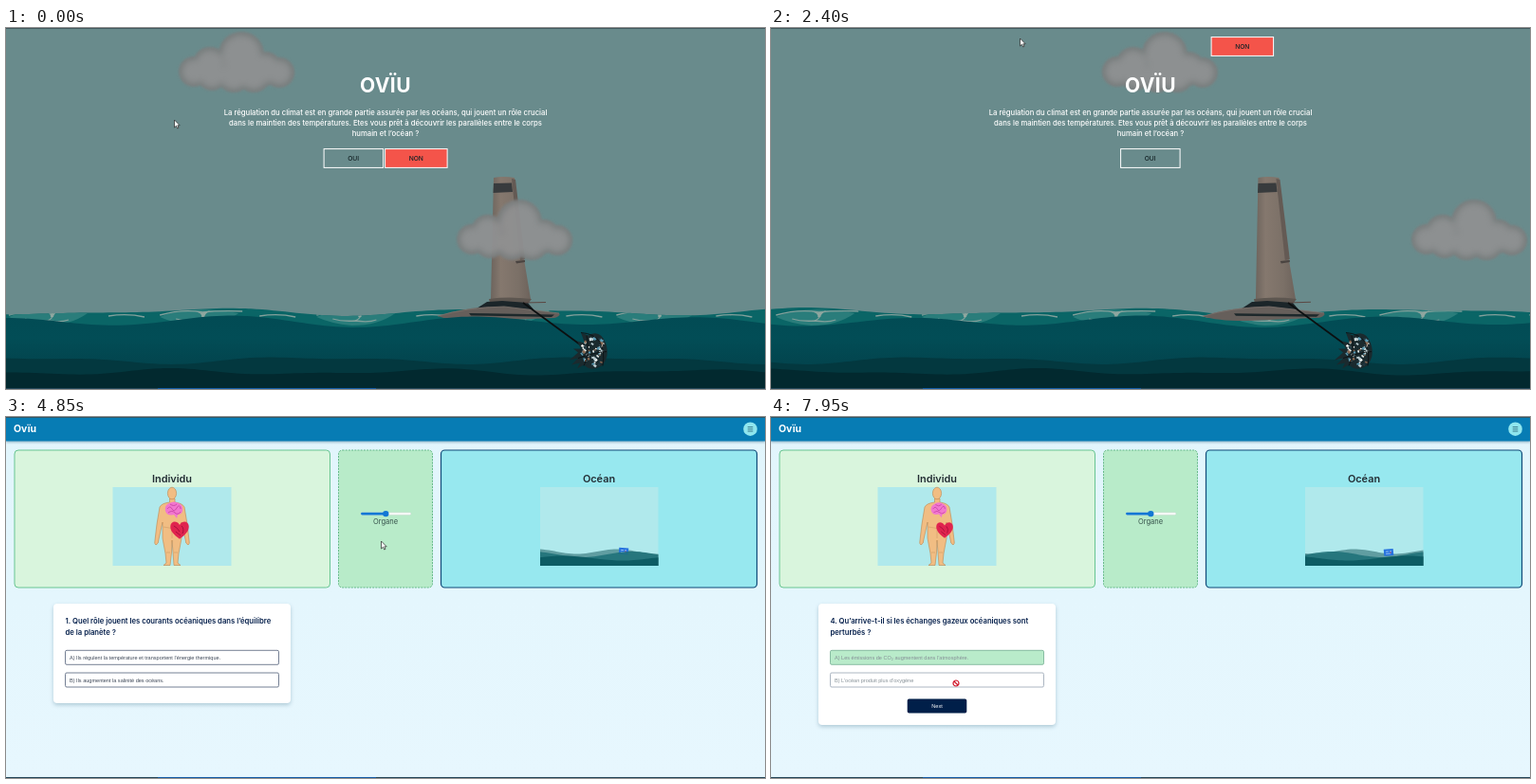
These frames come from a looping animation (800x381 px, 8000 ms). An HTML page:

```html
<!DOCTYPE html>
<html lang="fr">
<head>
<meta charset="utf-8">
<title>Ovïu</title>
<style>
  html, body { margin: 0; width: 100%; height: 100%; overflow: hidden; background: #698b8c; }
  svg { display: block; width: 100vw; height: 100vh; }
  text { font-family: Inter, "Open Sans", sans-serif; }
  .mid { text-anchor: middle; }
  .form { font-family: "Liberation Sans", Arial, sans-serif; font-size: 5.55px; }
  .intro { font-size: 7.7px; font-weight: 500; fill: #fff; }
  .btn { font-size: 6.7px; font-weight: 500; fill: #142326; }
  .head { font-size: 10.9px; font-weight: 600; fill: #222c33; }
  .ask { font-size: 7.7px; font-weight: 600; fill: #06204c; }
</style>
</head>
<body>
<svg viewBox="0 0 800 381" preserveAspectRatio="none">
  <defs>
    <linearGradient id="sea" x2="0" y2="1">
      <stop stop-color="#024b54"/><stop offset=".3" stop-color="#024d56"/><stop offset="1" stop-color="#033c46"/>
    </linearGradient>
    <linearGradient id="sail">
      <stop stop-color="#6d645d"/><stop offset=".25" stop-color="#85786e"/><stop offset=".7" stop-color="#7b7067"/><stop offset="1" stop-color="#6d635c"/>
    </linearGradient>
    <linearGradient id="page" x2="0" y2="1">
      <stop stop-color="#e1f5fc"/><stop offset="1" stop-color="#e7f7fe"/>
    </linearGradient>
    <filter id="soft" x="-20%" y="-20%" width="140%" height="140%"><feGaussianBlur stdDeviation="1"/></filter>
    <filter id="softer" x="-20%" y="-20%" width="140%" height="140%"><feGaussianBlur stdDeviation="3.2"/></filter>
    <filter id="shade" x="-10%" y="-10%" width="120%" height="130%"><feGaussianBlur stdDeviation="2.2"/></filter>
    <clipPath id="pool"><rect x="563" y="74" width="124.500" height="83"/></clipPath>
    <clipPath id="swell"><path id="swellClip"/></clipPath>
  </defs>

  <g id="home">
    <rect width="800" height="381" fill="#698b8c"/>
    <path id="back" fill="#0a6566"/>
    <g clip-path="url(#swell)"><g id="glints"></g></g>
    <g id="boat">
      <path d="M514 158Q524 156 536 158L546 244 553 286H511Z" fill="url(#sail)"/>
      <path d="M533 159L537 160 547 244 542 245Z" fill="#645a54"/>
      <path d="M537 246L547 245V247L538 248.500Z" fill="#4a4441"/>
      <path d="M514 164L533 163.500 534 173 513.500 174Z" fill="#383b3d"/>
      <path d="M509 286Q530 283 554 286L551 290H510Z" fill="#5d5650"/>
      <path d="M496 296L507 289L523 288L550 290L556 297Z" fill="#1b2529"/>
      <path d="M545 290L569 289.500" stroke="#5b4843"/>
      <path d="M455 304Q485 294 525 294L583 301Q585 304 578 306L500 309Q470 309 455 304Z" fill="#665f5b"/>
      <path d="M488 301L578 302.500L575 305L490 303.500Z" fill="#1d282b"/>
      <path d="M455 304Q485 295 525 294L583 301" fill="none" stroke="#7d746e" stroke-width=".8"/>
    </g>
    <path id="front" fill="url(#sea)"/>
    <path id="deep" fill="#03383f"/>
    <path id="floor" fill="#02292f"/>
    <path d="M545 290L609 337" stroke="#0b0f10" stroke-width="1.700"/>
    <g id="net" transform="translate(0 1.500)"></g>
    <g id="cloudA"></g>
    <g id="cloudB"></g>
    <text class="mid" x="400" y="68" font-size="21" font-weight="700" letter-spacing=".4" fill="#fff">OVÏU</text>
    <g class="mid intro">
      <text x="400" y="92">La régulation du climat est en grande partie assurée par les océans, qui jouent un rôle crucial</text>
      <text x="400" y="103">dans le maintien des températures. Etes vous prêt à découvrir les parallèles entre le corps</text>
      <text x="400" y="114">humain et l’océan ?</text>
    </g>
    <g id="yes">
      <rect x=".6" y=".6" width="62.500" height="19.800" fill="none" stroke="#fff"/>
      <text class="mid btn" x="31.700" y="13">OUI</text>
    </g>
    <g id="no">
      <rect x=".6" y=".6" width="65.500" height="19.800" fill="#f4544a" stroke="#fff"/>
      <text class="mid btn" x="33.300" y="13">NON</text>
    </g>
  </g>

  <g id="quiz">
    <rect width="800" height="381" fill="url(#page)"/>
    <rect y="4" width="800" height="23" fill="#5e8ba5" opacity=".5" filter="url(#soft)"/>
    <rect width="800" height="25.500" fill="#077cb4"/>
    <text x="8" y="16.300" font-size="10.500" font-weight="700" fill="#fff">Ovïu</text>
    <circle cx="784.500" cy="12.700" r="7.300" fill="#8fe6ee"/>
    <path d="M781.700 10.600h5.600M781.700 12.800h5.600M781.700 15h5.600" stroke="#245f73" stroke-width=".8"/>
    <rect x="9" y="35" width="332.500" height="145" rx="4" fill="#d9f5dd" stroke="#68c592"/>
    <rect x="350.500" y="35" width="99" height="145" rx="4" fill="#b8ebc9" stroke="#63b887" stroke-dasharray="2 1.200"/>
    <rect x="458.500" y="35" width="333" height="145" rx="4" fill="#97e8ef" stroke="#104a78" stroke-width="1.200"/>
    <text class="mid head" x="175" y="69">Individu</text>
    <text class="mid head" x="625" y="69">Océan</text>
    <rect x="112.500" y="74" width="125" height="83" fill="#b0e9ec"/>
    <path d="M172.500 86V90Q164 91 162 95L159 113 157 130Q156 134 158 135Q161 134 161 129L165 111 165 128 168 144 169 154 166 156.500H173L174.500 143 175 130 176 143 177 156.500H184L181 154 182 144 185 128 185 111 189 129Q189 134 192 135Q194 134 193 130L191 113 188 95Q186 91 178 90V86Z" fill="#f1bd83" stroke="#bc8751" stroke-width=".6"/>
    <ellipse cx="175" cy="80.500" rx="4.600" ry="6.300" fill="#f1bd83" stroke="#bc8751" stroke-width=".6"/>
    <path d="M166 116Q175 119 184 116M175 119V128M169 143H173M177 143H181" fill="none" stroke="#cf9c66" stroke-width=".6"/>
    <g id="brain">
      <path d="M-9 1Q-10-5-5-7Q0-10 5-7Q10-5 9 1Q8 5 4 5L3 9 0 5Q-7 7-9 1Z" fill="#f277cf"/>
      <path d="M-7-1Q-4-5-2-1T3-2T7-1M-6 3Q-2 0 1 3T7 2M-4-6Q0-3 3-6" fill="none" stroke="#c945a5" stroke-width=".9"/>
    </g>
    <g id="heart">
      <path d="M0 9.500C-6 5-10 1-9.500-4C-9-9-3-10 0-5C3-10 9-9 9.500-4C10 1 6 5 0 9.500Z" fill="#e0244f"/>
      <path d="M-6-4Q-2-2 0 2M2-4Q5-1 3 4M-4 2L1 6" fill="none" stroke="#a30f3a" stroke-width=".9"/>
    </g>
    <rect x="374" y="100.700" width="53" height="2.800" rx="1.400" fill="#f7f9f8" stroke="#b5c7bf" stroke-width=".3"/>
    <rect x="374" y="100.700" width="26" height="2.800" rx="1.400" fill="#1277d4"/>
    <circle cx="400.300" cy="102.100" r="3.200" fill="#1277d4"/>
    <text class="mid" x="400" y="113.300" font-size="7.500" fill="#34504a">Organe</text>
    <g clip-path="url(#pool)">
      <rect x="563" y="74" width="125" height="83" fill="#b0e9ec"/>
      <path id="poolA" fill="#609da1"/>
      <g id="crate">
        <rect x="-5" y="-3.500" width="10" height="7" fill="#2672df"/>
        <path d="M-3-1H0M1-1H3M-3 1.300H2" stroke="#a9cdf5" stroke-width=".8"/>
        <path d="M1 .3H3" stroke="#b44870" stroke-width=".8"/>
      </g>
      <path id="poolB" fill="#1d7077" opacity=".85"/>
      <path id="poolC" fill="#0d5c64"/>
    </g>
    <rect id="cardShade" x="50" y="199" width="250" rx="4" fill="#6e94a8" opacity=".45" filter="url(#shade)"/>
    <rect id="card" x="50" y="197" width="250" rx="4" fill="#fff"/>
    <text id="ask1" class="ask" x="62.500" y="217.500"/>
    <text id="ask2" class="ask" x="62.500" y="229.500"/>
    <rect id="boxA" x="62.500" y="246.300" width="225" height="15" rx="1.500" stroke-width=".8"/>
    <rect id="boxB" x="62.500" y="270" width="225" height="15" rx="1.500" stroke-width=".8"/>
    <text id="optA" class="form" x="67" y="255.800"/>
    <text id="optB" class="form" x="67" y="279.500"/>
    <g id="next">
      <rect x="143.700" y="297.600" width="62.600" height="15" rx="1.800" fill="#001f49"/>
      <text class="form mid" x="175" y="307" fill="#fff">Next</text>
    </g>
  </g>

  <g id="cursor">
    <path id="arrow" d="M-1.500-4V4L.4 2.300 1.700 5 3 4.400 1.800 1.800H4.200Z" fill="#fff" stroke="#222" stroke-width=".7"/>
    <path id="hand" d="M-1-4Q.2-5 .6-3.800V-.6L4 .3Q5 .8 4.700 2.500L4 5H-.3L-3 1.800Q-3 .4-1 1.300Z" fill="#fff" stroke="#111" stroke-width=".7"/>
    <g id="stop" fill="#fff" stroke="#d1182b" stroke-width="1.200"><circle r="3"/><path d="M-2-2L2 2"/></g>
  </g>
  <path d="M0 .4H800" stroke="#394f55" stroke-width=".9"/>
  <path d="M0 380.500H800" stroke="#25485a"/>
  <path d="M160 380.500H390" stroke="#155da7"/>
</svg>
<script>
const LOOP = 8000, QUIZ_AT = 4450, TAU = Math.PI * 2;
const $ = id => document.getElementById(id);
const set = (id, attrs) => { for (const k in attrs) $(id).setAttribute(k, attrs[k]); };
const show = (id, on) => set(id, { display: on ? 'inline' : 'none' });
const move = (id, x, y, more = '') => set(id, { transform: `translate(${x} ${y}) ${more}` });

let seed = 7;
const rnd = () => (seed = seed * 16807 % 2147483647) / 2147483647;

// Closed wave; each part is [amplitude, period, speed in px/s, phase]
function wave(t, y, parts, x0 = 0, x1 = 800, bottom = 381, step = 6) {
  let d = `M${x0} ${bottom}`;
  for (let x = x0; x <= x1 + step; x += step) {
    let h = y;
    for (const [a, p, v, f] of parts) h += a * Math.sin(TAU * ((x - v * t / 1000) / p + f));
    d += `L${x} ${h.toFixed(2)}`;
  }
  return d + `V${bottom}Z`;
}

function makeCloud(id) {
  const lobes = [[-45, 43, 16], [-28, 35, 18], [-26, 47, 16], [5, 25, 24], [-3, 47, 18], [18, 47, 18], [30, 40, 18], [45, 44, 16]];
  const discs = (cut, fill, blur) => `<g fill="${fill}" filter="url(#${blur})">` +
    lobes.map(([x, y, r]) => `<circle cx="${x}" cy="${y}" r="${r - cut}"/>`).join('') + '</g>';
  $(id).innerHTML = discs(0, '#787c7c', 'soft') + discs(4, '#909192', 'softer');
  set(id, { opacity: .94 });
}

function makeGlints() {
  let s = '';
  for (let i = 0; i < 9; i++) {
    const x = i * 160 + rnd() * 10;
    s += `<g transform="translate(${x} 301)">` +
      '<path d="M-45 4Q-15-9 38 0Q20 13 -8 13Q-30 11-45 4Z" fill="#2a7d7b"/>' +
      '<path d="M-45 2Q-20-5 0-1Q18-3 42-2M0-1Q4 4-4 8M-4 8Q-18 9-28 6M-4 8Q10 10 18 7M60 3Q80 0 98 4" fill="none" stroke="#83a09b" stroke-width="1.300"/>' +
      '<path d="M-8-2Q0 1 8-3Q2 1 2 4L-1 4Q0 0-8-2Z" fill="#8fa69f"/></g>';
  }
  $('glints').innerHTML = s;
}

function makeNet() {
  let s = '<path d="M606 320L614 323Q626 316 632 331Q637 345 628 355Q617 362 609 354L602 358 605 352 596 354 603 347 594 349 603 341 598 337 606 337 602 329 610 331Z" fill="#1a2a2e"/>';
  const tints = ['#e6ecea', '#b9cbd0', '#5b9cb5', '#8a6851', '#f4f4f0', '#20363e'];
  for (let i = 0; i < 60; i++) {
    const a = rnd() * TAU, r = 13.5 * Math.sqrt(rnd());
    const x = 619 + r * Math.cos(a), y = 338 + r * 1.15 * Math.sin(a);
    s += `<rect x="${x}" y="${y}" width="${1.4 + rnd() * 2.4}" height="${1.2 + rnd() * 1.8}" fill="${tints[i % 6]}" transform="rotate(${rnd() * 90} ${x} ${y})"/>`;
  }
  s += '<path d="M606 320Q634 322 629 355M612 323Q616 342 609 355M603 347Q620 341 633 340" fill="none" stroke="#0c1113" stroke-width=".9"/>';
  $('net').innerHTML = s;
}

// Cursor stops: [ms, x, y]
const trail = [
  [0, 179, 101], [350, 260, 125], [600, 400, 138], [1000, 330, 75], [1450, 275, 30], [1600, 290, 22],
  [2000, 276, 14], [2400, 264, 15], [2850, 463, 18], [3200, 480, 60], [3900, 475, 120], [4250, 399, 136],
  [4850, 397, 135], [5300, 250, 225], [5700, 170, 278], [6000, 165, 280], [6350, 160, 305], [6700, 159, 309],
  [6830, 159, 309], [7020, 170, 256], [7200, 172, 305], [7400, 180, 256], [7560, 180, 305], [7750, 200, 256],
  [7950, 195, 281], [8000, 193, 287]
];
function cursorAt(t) {
  const i = Math.max(1, trail.findIndex(p => p[0] > t));
  const [t0, x0, y0] = trail[i - 1], [t1, x1, y1] = trail[i];
  let k = (t - t0) / (t1 - t0);
  k = k * k * (3 - 2 * k);
  return [x0 + (x1 - x0) * k, y0 + (y1 - y0) * k];
}

const GREEN = ['#cdf7d9', '#74c795'], PINK = ['#fbc2c9', '#e48e9b'], PLAIN = ['#fff', '#526079'];
const questions = [
  { from: QUIZ_AT, done: 5900, a: GREEN, b: PINK, text: [
    '1. Quel rôle jouent les courants océaniques dans l’équilibre', 'de la planète ?',
    'A) Ils régulent la température et transportent l’énergie thermique.', 'B) Ils augmentent la salinité des océans.'] },
  { from: 6820, done: 7040, a: GREEN, b: PLAIN, text: [
    '2. Comment les océans participent-ils à la régulation', 'du climat ?',
    'A) Ils absorbent une partie de la chaleur.', 'B) Ils bloquent les rayons du soleil.'] },
  { from: 7210, done: 7410, a: GREEN, b: PLAIN, text: [
    '3. Quel organe peut-on comparer aux courants', 'océaniques ?',
    'A) Le cœur, qui fait circuler le sang.', 'B) La peau, qui protège le corps.'] },
  { from: 7570, done: 7760, a: ['#b9ebca', '#74ae91'], b: ['#fff', '#97a4b3'], text: [
    '4. Qu’arrive-t-il si les échanges gazeux océaniques sont', 'perturbés ?',
    'A) Les émissions de CO₂ augmentent dans l’atmosphère.', 'B) L’océan produit plus d’oxygène'] }
];

function drawHome(t) {
  const crest = wave(t, 299.5, [[3, 320, 65, .1], [1.5, 190, 65, .4]]);
  set('back', { d: crest });
  set('swellClip', { d: crest });
  move('glints', -275 + t * .065, 0);
  set('front', { d: wave(t, 309.5, [[5, 245, 63, .76], [1.5, 410, 63, .3]]) });
  set('deep', { d: wave(t, 350.5, [[3, 313, -57, .723], [1.5, 156, -57, .1]]) });
  set('floor', { d: wave(t, 363, [[2.5, 270, 45, .1], [1.5, 150, 45, .6]]) });
  move('boat', 0, 0, `rotate(${.25 * Math.sin(TAU * t / 2900)} 530 300)`);
  move('cloudA', 243 + t * .0695, 3);
  move('cloudB', 536 + t * .0833, 180);
  const spot = t < 600 ? [399, 127] : t < 1600 ? [287, 10] : [463.5, 9];
  show('no', t < 2850);
  move('no', ...spot);
  move('yes', t < 600 ? 334.5 : 368, 127);
}

function drawQuiz(t) {
  const q = questions.filter(o => t >= o.from).pop(), done = t >= q.done;
  ['ask1', 'ask2', 'optA', 'optB'].forEach((id, i) => { $(id).textContent = q.text[i]; });
  for (const [id, look] of [['A', q.a], ['B', q.b]]) {
    const [fill, stroke] = done ? look : PLAIN;
    set('box' + id, { fill, stroke });
    set('opt' + id, { fill: done ? '#858f96' : '#3c4656' });
  }
  show('next', done);
  for (const id of ['card', 'cardShade']) set(id, { height: done ? 128 : 105 });

  const beat = Math.cos(TAU * (t - 4850) / 1233);
  move('brain', 177, 98, `scale(${.96 + .05 * beat})`);
  move('heart', 183, 119, `scale(${.97 + .05 * beat})`);
  const pool = (id, y, parts) => set(id, { d: wave(t, y, parts, 563, 688, 157, 3) });
  pool('poolA', 142, [[2.5, 85, 18, .2]]);
  pool('poolB', 145, [[3, 105, -22, .45]]);
  pool('poolC', 149, [[2.5, 125, 27, .1]]);
  move('crate', 651, 142 + Math.sin(TAU * t / 2500), `rotate(${5 * Math.sin(TAU * t / 2100)})`);
  return done;
}

function draw(t) {
  const quiz = t >= QUIZ_AT, [x, y] = cursorAt(t);
  show('home', !quiz);
  show('quiz', quiz);
  let kind = 'arrow';
  if (quiz) {
    const done = drawQuiz(t);
    const inside = (x0, x1, y0, y1) => x > x0 && x < x1 && y > y0 && y < y1;
    if (inside(62, 288, 246, 262) || inside(62, 288, 270, 286)) kind = done ? 'stop' : 'hand';
    else if (done && inside(143, 207, 297, 313)) kind = 'hand';
  } else drawHome(t);
  for (const id of ['arrow', 'hand', 'stop']) show(id, id === kind);
  move('cursor', x, y);
}

makeCloud('cloudA');
makeCloud('cloudB');
makeGlints();
makeNet();
const start = performance.now();
(function tick() {
  draw((performance.now() - start) % LOOP);
  requestAnimationFrame(tick);
})();
</script>
</body>
</html>
```
